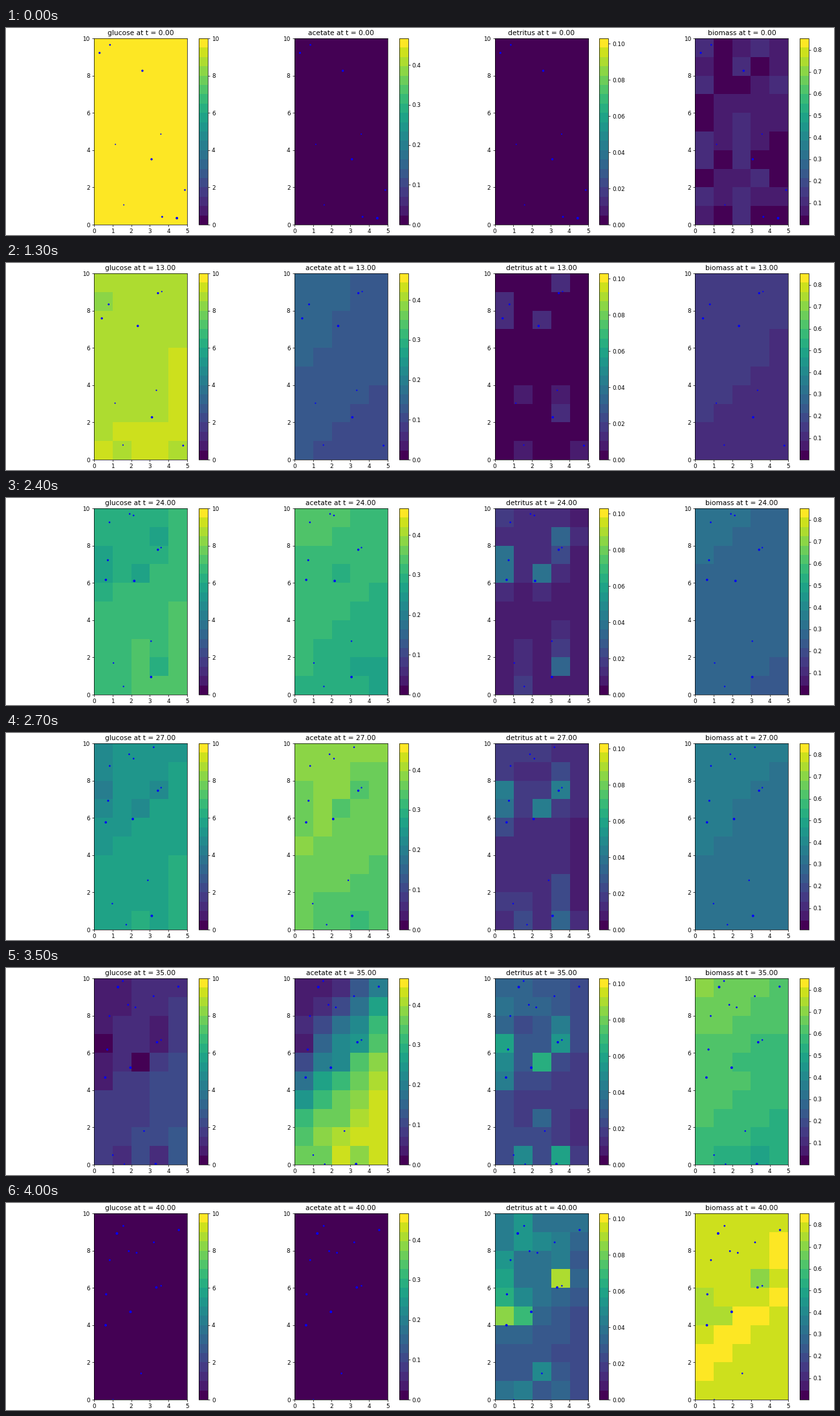
A matplotlib script for the animation above (4.1 s loop, 1280 by 320 pixels).

```python
import numpy as np
import matplotlib.pyplot as plt
from matplotlib.animation import FuncAnimation
from matplotlib.colors import ListedColormap

W, H, DPI = 1280, 320, 64
STEPS, COLS, ROWS = 41, 5, 10
SINK = 0.105      # usual sinking speed per step
DECAY = 0.28      # how fast deposits follow the particles
rng = np.random.default_rng(4)

plt.rcParams.update({"font.family": "DejaVu Sans", "font.size": 10})

# Growth starts at the top left and reaches the bottom right last.
row, col = np.mgrid[0:ROWS, 0:COLS]
lag = 2.4 * (1 - (row + 0.5) / ROWS) + 1.2 * col / (COLS - 1)

# Level against local time, in fractions of each colour scale
CURVES = {
    "glucose": [(0, 1), (10.9, .9), (13, .88), (20, .765), (27, .5),
                (31, .31), (35, .07), (36, 0)],
    "acetate": [(0, 0), (9.5, .22), (13, .34), (20, .57), (27, .86), (30, .96),
                (32.2, .93), (33.2, .68), (34.2, .15), (35, .08), (36.5, 0)],
    "detritus": [(12, 0), (20, .08), (27, .16), (31, .21), (35, .29), (40, .42)],
    "biomass": [(0, .045), (11, .15), (20, .28), (27, .43), (31, .58),
                (35, .82), (36.5, .92), (38, .96), (40, .94)],
}

# Effect of deposits on each field: strength and growth power over the run
EFFECT = {"glucose": (-.3, 0), "acetate": (-.4, 2),
          "detritus": (1, 0), "biomass": (-.2, 8)}

# Particles present at the start: diameter, x, y, sideways drift, sinking speed
RESIDENTS = [
    (2.7, .86, 9.65, -.003, .1), (3.2, .3, 9.22, .008, .13),
    (3.4, 2.6, 8.26, -.018, .088), (2, 3.59, 4.86, -.027, .085),
    (1.9, 1.15, 4.31, -.003, SINK), (3.4, 3.09, 3.51, .003, .1),
    (2.7, 4.88, 1.86, -.01, .093), (1.9, 1.6, 1.06, .004, .03),
    (2.9, 3.66, .42, 0, SINK), (3.9, 4.45, .35, 0, SINK),
]
# Later ones fall in through the top: diameter, entry time, x
ARRIVALS = [
    (3.1, 3, 3.42), (1.9, 3, 3.66), (2.3, 16, .82), (2.2, 20, 2.25),
    (2.2, 21, 1.87), (2.2, 25, 3.18), (3.4, 30, 1.23), (2.7, 31, 4.55),
    (2.2, 34, 1.55),
]
PARTICLES = ([(d, 0, x, y, vx, vy) for d, x, y, vx, vy in RESIDENTS]
             + [(d, t, x, ROWS, 0, SINK) for d, t, x in ARRIVALS])
diameters = np.array([p[0] for p in PARTICLES])
births = np.array([p[1] for p in PARTICLES])


def path(birth, x, y, drift, sink):
    """Steady sinking with a small wobble; NaN before the particle appears."""
    out = np.full((STEPS, 2), np.nan)
    wobble = np.zeros(2)
    for t in range(birth, STEPS):
        age = t - birth
        out[t] = np.array([x + drift * age, y - sink * age]) + wobble
        wobble = 0.85 * wobble + rng.normal(0, 0.03, 2)
    return out


paths = np.stack([path(*p[1:]) for p in PARTICLES], axis=1)


def bleed(grid, share):
    """Add a share of the four neighbours to each cell."""
    p = np.pad(grid, 1)
    return grid + share * (p[:-2, 1:-1] + p[2:, 1:-1] + p[1:-1, :-2] + p[1:-1, 2:])


def deposits():
    """Matter left by the particles, more from old ones, fading as they leave."""
    weight = np.clip((diameters - 0.8) / 2.6, 0.4, 1)
    state, out = np.zeros((ROWS, COLS)), []
    for t in range(STEPS):
        out.append(bleed(state, 0.08))
        supply = np.zeros_like(state)
        for (x, y), w, birth in zip(paths[t], weight, births):
            if 0 <= x < COLS and 0 <= y < ROWS:
                supply[int(y), int(x)] += 0.014 * (t - birth) * w
        state = state + DECAY * (supply - state)
    return np.array(out)


steps = np.arange(STEPS)[:, None, None]
excess = deposits()


def field(name):
    times, values = zip(*CURVES[name])
    strength, power = EFFECT[name]
    base = np.interp(steps - lag, times, values)
    if name == "detritus":
        base = base * (1 - 0.12 * lag)
    if name == "biomass":
        inoculum = rng.choice([0, .06, .11], (ROWS, COLS), p=[.36, .44, .2])
        base = base + np.exp(-steps / 1.8) * (inoculum - .045)
    return np.clip(base + strength * (steps / 40) ** power * excess, 0, 1)


# name, low, high, colour bar ticks, tick format
PANELS = [
    ("glucose", 0, 10, np.arange(0, 11, 2), "%d"),
    ("acetate", 0, 0.467, np.arange(0, 5) / 10, "%.1f"),
    ("detritus", 0, 0.103, np.arange(0, 6) / 50, "%.2f"),
    ("biomass", 0.001, 0.853, np.arange(1, 9) / 10, "%.1f"),
]

levels = (np.arange(20) + 0.5) / 20
levels[[0, -1]] = 0, 1
cmap = ListedColormap(plt.get_cmap("viridis")(levels))

fig = plt.figure(figsize=(W / DPI, H / DPI), dpi=DPI, facecolor="white")


def box(x, width):
    return fig.add_axes([x / W, 16 / H, width / W, 288 / H])


def panel(i, name, low, high, ticks, fmt):
    left = 136 + 309.8 * i
    ax = box(left, 144)
    values = low + field(name) * (high - low)
    image = ax.imshow(values[0], cmap=cmap, vmin=low, vmax=high,
                      extent=(0, COLS, 0, ROWS), origin="lower",
                      aspect="auto", interpolation="nearest")
    dots = ax.scatter([], [], color="blue", linewidths=0, zorder=2)
    ax.set(xlim=(0, COLS), ylim=(0, ROWS),
           xticks=range(COLS + 1), yticks=range(0, ROWS + 1, 2))
    title = ax.set_title("", fontsize=12)
    bar = fig.colorbar(image, cax=box(left + 161.8, 14), ticks=ticks, format=fmt)
    bar.ax.minorticks_off()
    return name, values, image, dots, title


views = [panel(i, *spec) for i, spec in enumerate(PANELS)]


def draw(t):
    seen = births <= t
    size = (diameters[seen] + 0.015 * t) * 72 / DPI
    for name, values, image, dots, title in views:
        image.set_data(values[t])
        dots.set_offsets(paths[t, seen])
        dots.set_sizes(size ** 2)
        title.set_text(f"{name} at t = {t:.2f}")
    return []


anim = FuncAnimation(fig, draw, frames=STEPS, init_func=lambda: draw(0),
                     interval=100, repeat=True, repeat_delay=0)
plt.show()
```
